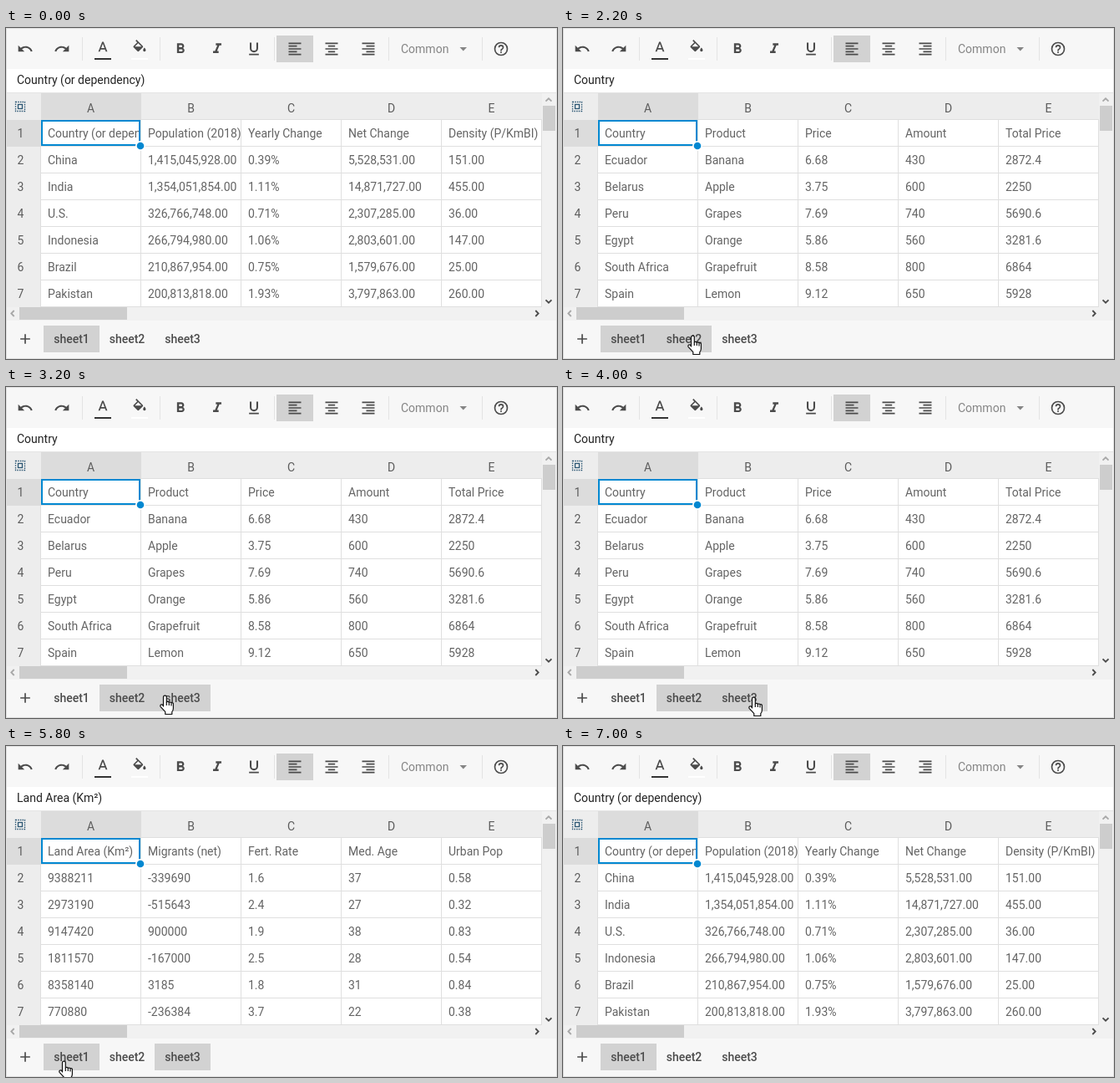
Recreate the animation shown at these times as an HTML page with a canvas. Size 660 px wide and 396 px high, loop 7600 ms.

```html
<!DOCTYPE html>
<html lang="en">
<head>
<meta charset="utf-8">
<title>Spreadsheet tabs</title>
<style>
html, body { margin: 0; width: 660px; height: 396px; overflow: hidden; }
canvas { display: block; }
</style>
</head>
<body>
<canvas id="stage" width="660" height="396"></canvas>
<script>
const ctx = document.getElementById('stage').getContext('2d');
const LOOP = 7600;
const COL = 120, ROW = 32, LEFT = 42, TOP = 110;
const BLUE = '#0288d1', DARK = '#4b4b4b';

const sheets = [
  `Country (or dependency)|Population (2018)|Yearly Change|Net Change|Density (P/KmВІ)
China|1,415,045,928.00|0.39%|5,528,531.00|151.00
India|1,354,051,854.00|1.11%|14,871,727.00|455.00
U.S.|326,766,748.00|0.71%|2,307,285.00|36.00
Indonesia|266,794,980.00|1.06%|2,803,601.00|147.00
Brazil|210,867,954.00|0.75%|1,579,676.00|25.00
Pakistan|200,813,818.00|1.93%|3,797,863.00|260.00`,
  `Country|Product|Price|Amount|Total Price
Ecuador|Banana|6.68|430|2872.4
Belarus|Apple|3.75|600|2250
Peru|Grapes|7.69|740|5690.6
Egypt|Orange|5.86|560|3281.6
South Africa|Grapefruit|8.58|800|6864
Spain|Lemon|9.12|650|5928`,
  `Land Area (Km²)|Migrants (net)|Fert. Rate|Med. Age|Urban Pop
9388211|-339690|1.6|37|0.58
2973190|-515643|2.4|27|0.32
9147420|900000|1.9|38|0.83
1811570|-167000|2.5|28|0.54
8358140|3185|1.8|31|0.84
770880|-236384|3.7|22|0.38`
].map(s => s.split('\n').map(row => row.split('|')));

const tabs = [['sheet1', 45, 112], ['sheet2', 112, 178], ['sheet3', 178, 245]];

// Stepped tracks: [start ms, value...]
const sheetTrack = [[0, 0], [2200, 1], [4600, 2], [6000, 0]];
const cursorTrack = [
  [0], [600, 98, 386], [800, 91, 374], [1000, 90, 371], [1200, 124, 369], [1400, 157, 368],
  [3200, 192, 369], [3400, 222, 371], [3600, 230, 371],
  [5200, 140, 375], [5400, 71, 377], [6600, 76, 381], [6800, 100, 389], [7000]
];
const at = (track, t) => track.findLast(key => key[0] <= t) || track[0];

// Icons on a 24-unit grid
const icons = {
  undo: 'M12.5 8C9.85 8 7.45 9 5.6 10.6L2 7V16H11L7.38 12.38C8.77 11.22 10.54 10.5 12.5 10.5C16.04 10.5 19.05 12.81 20.1 16L22.47 15.22C21.08 11.03 17.15 8 12.5 8Z',
  color: 'M9.62 12L12 5.67L14.37 12ZM11 3L5.5 17H7.75L8.87 14H15.12L16.25 17H18.5L13 3Z',
  fill: 'M19 11.5S17 13.67 17 15A2 2 0 0 0 21 15C21 13.67 19 11.5 19 11.5ZM5.21 10L10 5.21L14.79 10ZM16.56 8.94L7.62 0L6.21 1.41L8.59 3.79L3.44 8.94C2.85 9.5 2.85 10.47 3.44 11.06L8.94 16.56C9.5 17.15 10.5 17.15 11.06 16.56L16.56 11.06C17.15 10.47 17.15 9.5 16.56 8.94Z',
  bold: 'M13.5 15.5H10V12.5H13.5A1.5 1.5 0 0 1 13.5 15.5ZM10 6.5H13A1.5 1.5 0 0 1 13 9.5H10ZM15.6 10.79C16.57 10.11 17.25 9 17.25 8C17.25 5.74 15.5 4 13.25 4H7V18H14.04C16.14 18 17.75 16.3 17.75 14.21C17.75 12.69 16.89 11.39 15.6 10.79Z',
  italic: 'M10 4V7H12.21L8.79 15H6V18H14V15H11.79L15.21 7H18V4Z',
  underline: 'M5 21H19V19H5ZM12 17A6 6 0 0 0 18 11V3H15.5V11A3.5 3.5 0 0 1 8.5 11V3H6V11A6 6 0 0 0 12 17Z',
  left: 'M3 3H21V5H3ZM3 7H15V9H3ZM3 11H21V13H3ZM3 15H15V17H3ZM3 19H21V21H3Z',
  center: 'M3 3H21V5H3ZM7 7H17V9H7ZM3 11H21V13H3ZM7 15H17V17H7ZM3 19H21V21H3Z',
  right: 'M3 3H21V5H3ZM9 7H21V9H9ZM3 11H21V13H3ZM9 15H21V17H9ZM3 19H21V21H3Z',
  help: 'M11 18H13V16H11ZM12 2A10 10 0 0 0 12 22A10 10 0 0 0 12 2ZM12 4A8 8 0 0 1 12 20A8 8 0 0 1 12 4ZM12 6A4 4 0 0 0 8 10H10A2 2 0 0 1 14 10C14 12 11 11.75 11 15H13C13 12.75 16 12.5 16 10A4 4 0 0 0 12 6Z',
  plus: 'M19 13H13V19H11V13H5V11H11V5H13V11H19Z'
};
for (const name in icons) icons[name] = new Path2D(icons[name]);
const hand = new Path2D('M4.5 13.5V2.5a1.9 1.9 0 0 1 3.8 0V8.5a1.7 1.7 0 0 1 3 .5a1.6 1.6 0 0 1 2.7 .7a1.4 1.4 0 0 1 2.4 1.3v5q0 2.4-1.6 4.2v2.8h-8v-2.8L1 13.8a1.7 1.7 0 0 1 2.4-2.2z');
const knuckles = new Path2D('M8.3 8.5v4M11.3 9v3.5M14 10v3');

function rect(x, y, w, h, color) {
  ctx.fillStyle = color;
  ctx.fillRect(x, y, w, h);
}
function disc(x, y, r, color) {
  ctx.beginPath();
  ctx.arc(x, y, r, 0, 7);
  ctx.fillStyle = color;
  ctx.fill();
}
function frame(x, y, w, h, color, width) {
  ctx.strokeStyle = color;
  ctx.lineWidth = width;
  ctx.strokeRect(x, y, w, h);
}
function text(str, x, y, color, { weight = 400, align = 'left' } = {}) {
  ctx.font = `${weight} 14px Roboto, sans-serif`;
  ctx.textAlign = align;
  ctx.fillStyle = color;
  ctx.fillText(str, x, y);
}
function icon(name, cx, cy = 25, flip = 1) {
  ctx.save();
  ctx.translate(cx, cy);
  ctx.scale(flip * 20 / 24, 20 / 24);
  ctx.translate(-12, -12);
  ctx.fillStyle = DARK;
  ctx.fill(icons[name], 'evenodd');
  ctx.restore();
}
function chevron(x, y, angle, color) {
  ctx.save();
  ctx.translate(x, y);
  ctx.rotate(angle);
  ctx.strokeStyle = color;
  ctx.lineWidth = 1.8;
  ctx.stroke(new Path2D('M-1.7 -3.5L1.7 0L-1.7 3.5'));
  ctx.restore();
}

function drawToolbar() {
  for (const x of [91, 184, 321, 458, 570]) rect(x, 11, 1, 28, '#e4e4e4');
  rect(324, 9, 44, 32, '#d2d2d2');
  icon('undo', 23);
  icon('undo', 67, 25, -1);
  icon('color', 116, 24);
  rect(106, 36, 20, 2, '#333');
  icon('fill', 160, 24);
  rect(150, 36, 20, 2, '#fff');
  ['bold', 'italic', 'underline'].forEach((name, i) => icon(name, 209 + 44 * i));
  ['left', 'center', 'right'].forEach((name, i) => icon(name, 346 + 44 * i));
  text('Common', 473, 30, '#858585');
  ctx.fill(new Path2D('M543.5 23h8.5l-4.25 4.5z'));
  icon('help', 593);
}

function drawSelectAll() {
  ctx.setLineDash([1.5, 1.2]);
  frame(11.5, 88.5, 11, 11, '#2b5673', 1.3);
  ctx.setLineDash([]);
  frame(14.5, 91.5, 5, 5, '#2b5673', 1.3);
}

function drawGrid(rows) {
  rect(1, 49, 658, 29, '#fff');
  rect(1, 77, 658, 1, '#e4e4e4');
  text(rows[0][0], 13, 67, '#222');

  rect(1, 78, 641, 32, '#ededed');
  rect(1, TOP, 41, 224, '#ededed');
  rect(LEFT, 78, COL, 32, '#dcdcdc');
  rect(LEFT, TOP, 600, 224, '#fff');
  for (let i = 0; i < 6; i++) rect(LEFT - 1 + COL * i, TOP, 1, 224, '#dfdfdf');
  for (let i = 0; i < 8; i++) rect(LEFT, TOP - 1 + ROW * i, 600, 1, '#dfdfdf');
  rect(1, TOP, 41, ROW, '#dcdcdc');
  drawSelectAll();

  [...'ABCDE'].forEach((c, i) => text(c, 101.5 + COL * i, 101, '#5c5c5c', { align: 'center' }));
  rows.forEach((row, r) => {
    const y = 131 + ROW * r;
    text(r + 1, 17.5, y, '#5c5c5c', { align: 'center' });
    row.forEach((value, c) => {
      ctx.save();
      ctx.beginPath();
      ctx.rect(LEFT + COL * c, TOP, COL - 1, 224);
      ctx.clip();
      text(value, 50 + COL * c, y, '#646464');
      ctx.restore();
    });
  });

  frame(LEFT + 1, TOP + 1, COL - 3, ROW - 3, BLUE, 2);
  disc(161, 141, 6, '#fff');
  disc(161, 141, 4.3, BLUE);
}

function drawScrollbars() {
  rect(642, 78, 17, 272, '#f1f1f1');
  rect(1, 334, 658, 16, '#f1f1f1');
  rect(643, 93, 15, 30, '#cdcdcd');
  rect(16, 334, 129, 15, '#cdcdcd');
  chevron(650, 86, -Math.PI / 2, '#a8a8a8');
  chevron(650, 327, Math.PI / 2, DARK);
  chevron(8, 341.5, Math.PI, '#a8a8a8');
  chevron(636, 341.5, 0, DARK);
}

function drawTabs(active, x, y) {
  icon('plus', 23, 372);
  tabs.forEach(([label, x0, x1], i) => {
    const hover = x >= x0 && x < x1 && y < 388;
    if (hover || i === active) rect(x0, 356, x1 - x0, 32, hover && i === active ? '#e4e4e4' : '#d2d2d2');
    text(label, (x0 + x1) / 2, 377, DARK, { weight: 500, align: 'center' });
  });
}

function drawHand(x, y) {
  ctx.save();
  ctx.translate(x - 8, y - 0.5);
  ctx.lineJoin = 'round';
  ctx.lineWidth = 1.2;
  ctx.fillStyle = '#fff';
  ctx.strokeStyle = '#111';
  ctx.fill(hand);
  ctx.stroke(hand);
  ctx.stroke(knuckles);
  ctx.restore();
}

function draw(now) {
  const t = now % LOOP;
  const [, x, y] = at(cursorTrack, t);
  rect(0, 0, 660, 396, '#f7f7f7');
  drawToolbar();
  drawGrid(sheets[at(sheetTrack, t)[1]]);
  drawScrollbars();
  drawTabs(at(sheetTrack, t - 200)[1], x, y); // the tab highlight lags behind the data
  frame(0.5, 0.5, 659, 395, '#dfdfdf', 1);
  if (x) drawHand(x, y);
  requestAnimationFrame(() => draw(performance.now() - start));
}
const start = performance.now();
draw(0);
</script>
</body>
</html>
```
